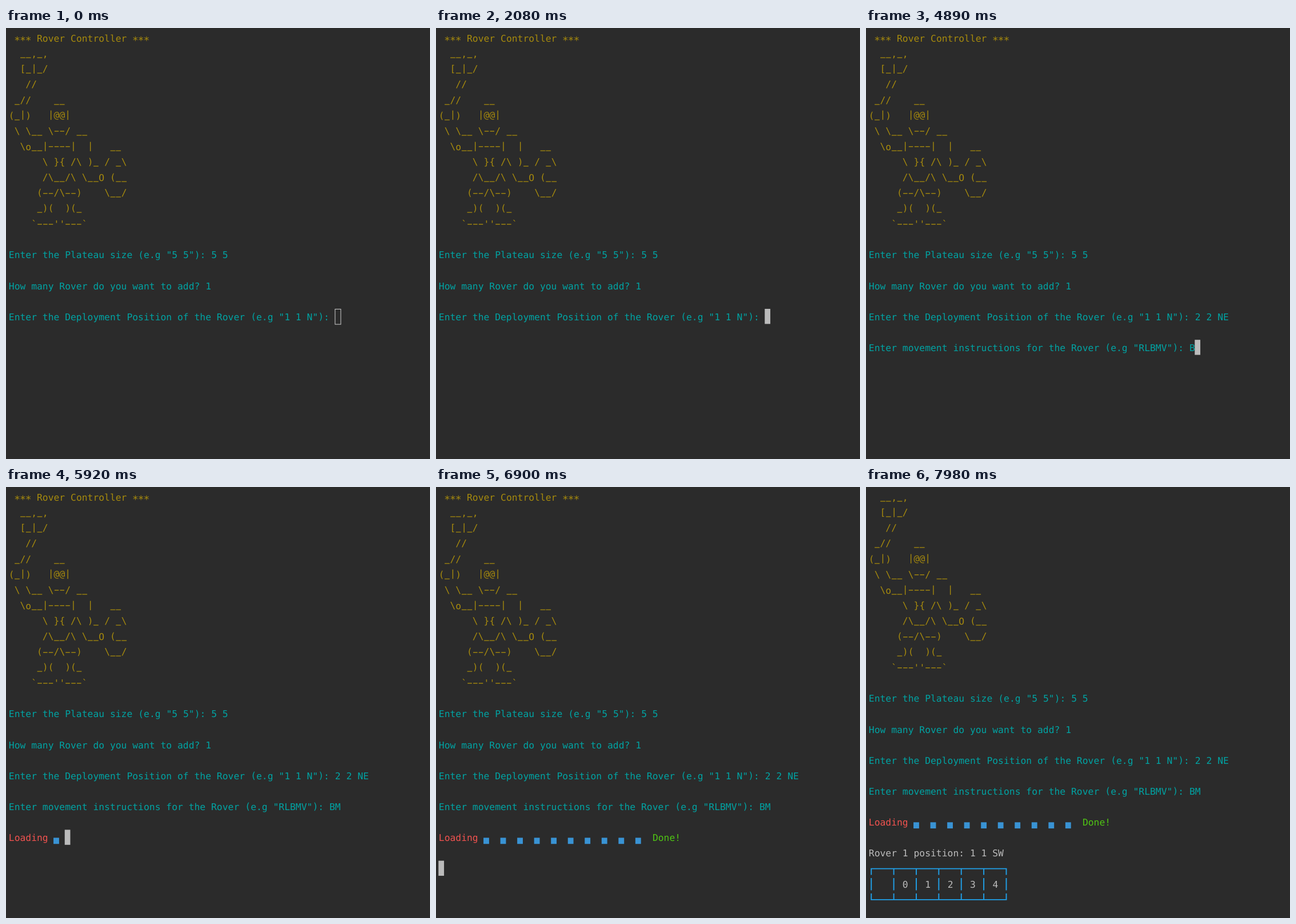
An HTML page that plays this animation: 742 px wide and 755 px high, repeating every 8000 ms.

```html
<!DOCTYPE html>
<html lang="en">
<head>
<meta charset="utf-8">
<title>Rover Controller</title>
<style>
  html, body { margin: 0; width: 100%; height: 100%; overflow: hidden; background: #2b2b2b; }
  svg { display: block; width: 742px; height: 755px; }
  text {
    font: 16.35px "DejaVu Sans Mono", monospace;
    white-space: pre;
    text-rendering: geometricPrecision;
    font-variant-ligatures: none;
  }
</style>
</head>
<body>
<svg id="stage" viewBox="0 0 742 755"></svg>
<script>
const LOOP = 8000;
const X0 = 4.3, CW = 9.845, Y0 = 4, RH = 27.11, BASE = 19.9, FONT = 16.35;
const YELLOW = '#a68a0d', CYAN = '#00a3a3', RED = '#f0524f', GREEN = '#4fc414',
      BLUE = '#3993d4', LINE = '#20a0e8', GREY = '#bbbbbb';

const ART = String.raw` *** Rover Controller ***
  __,_,
  [_|_/
   //
 _//    __
(_|)   |@@|
 \ \__ \--/ __
  \o__|----|  |   __
      \ }{ /\ )_ / _\
      /\__/\ \__O (__
     (--/\--)    \__/
     _)(  )(_
    ${'`'}---''---${'`'}`.split('\n');

const ASK_POS = 'Enter the Deployment Position of the Rover (e.g "1 1 N"): ';
const ASK_MOVE = 'Enter movement instructions for the Rover (e.g "RLBMV"): ';
const POS_KEYS = [2230, 2500, 2760, 2900, 3290, 3440];
const MOVE_KEYS = [4890, 5160];
const BLOCKS = [5920, 6030, 6100, 6250, 6360, 6470, 6570, 6680, 6790, 6900];
const CELLS = [7470, 7570, 7670, 7760, 7900, 7980];

// mouse path: time, x, y
const MOUSE = [
  [130, 672, 617], [210, 655, 575], [290, 640, 537], [360, 629, 506], [440, 622, 492],
  [660, 623, 495], [820, 632, 493], [930, 645, 490], [1130, 662, 487], [1240, 683, 485]
];
const MOUSE_END = 1350;

// vertical nudge and size of the glyphs that sit differently on the line
const NUDGE = { '*': 3.8, '_': -1.8, '|': -2, '/': -0.8, '\\': -0.8, '(': -0.8, ')': -0.8,
                '[': -0.8, '{': -0.8, '}': -0.8, '@': -1.5, '-': -1.3 };
const SIZE = { '*': 18, '_': 14, '-': 13.5 };

const colX = c => X0 + c * CW;
const rowY = r => Y0 + r * RH;
const count = (times, t) => times.filter(k => k <= t).length;
const n2 = v => +v.toFixed(2);

function write(row, col, str, fill) {
  const y = rowY(row) + BASE;
  let out = '';
  for (const m of str.matchAll(/[*_|/\\()[{}@-]|[^*_|/\\()[{}@-]+/g)) {
    const s = m[0], size = SIZE[s] || FONT;
    const x = colX(col + m.index) + 0.5 + (FONT - size) * 0.3;
    const bold = size < FONT ? ` stroke="${fill}" stroke-width=".4"` : '';
    out += `<tspan x="${n2(x)}" y="${n2(y + (NUDGE[s] || 0))}" style="font-size:${size}px"${bold}>` +
           `${s === '-' ? '\u2212' : s}</tspan>`;
  }
  return `<text fill="${fill}">${out}</text>`;
}

const rect = (x, y, w, h, fill) =>
  `<rect x="${n2(x)}" y="${n2(y)}" width="${n2(w)}" height="${n2(h)}" fill="${fill}"/>`;

const caret = (row, col) => rect(colX(col), rowY(row), 9.75, 26.4, GREY);

const hollow = (row, col) =>
  `<rect x="${n2(colX(col) + .6)}" y="${n2(rowY(row) + .5)}" width="10" height="26.6" fill="none" stroke="#d0d0d0"/>`;

function table(row, cells) {
  const mid = r => rowY(r) + BASE - 5.9;
  const top = mid(row), low = mid(row + 2), left = colX(.5), right = colX(cells * 4 + .5);
  let d = `M${left - 1} ${top}H${right + 1}M${left - 1} ${low}H${right + 1}`;
  let out = '';
  for (let i = 0; i <= cells; i++) {
    const x = colX(i * 4 + .5);
    d += `M${x} ${top}v10.8M${x} ${mid(row + 1) - 10.8}v21.6M${x} ${low}v-10.8`;
    if (i > 1) out += write(row + 1, i * 4 - 2, String(i - 2), GREY);
  }
  return `<path d="${d}" fill="none" stroke="${LINE}" stroke-width="1.9"/>` + out;
}

function mouse(t) {
  const at = MOUSE[count(MOUSE.map(p => p[0]), t) - 1];
  if (!at || t >= MOUSE_END) return '';
  return `<path transform="translate(${at[1]} ${at[2]})" d="M.5 .5V16.5L4.2 13L6.7 18.5L9 17.5L6.6 12H11.5Z" fill="#fff" stroke="#000"/>`;
}

function caretAt(t) {
  if (t < 1020) return hollow(18, 58);
  if (t < 1550 || (t >= 2080 && t < 3890)) return caret(18, 58 + count(POS_KEYS, t));
  if (t >= 4370 && t < 5630) return caret(20, 57 + count(MOVE_KEYS, t));
  if (t >= 5850 && t < 6900) return caret(22, 7 + 3 * count(BLOCKS, t));
  if (t >= 6900 && t < 7370) return caret(24, 0);
  return '';
}

function scene(t) {
  const cells = count(CELLS, t), up = cells ? 1 : 0;
  let out = '';
  ART.forEach((s, i) => { if (i >= up) out += write(i - up, 0, s, YELLOW); });
  out += write(14 - up, 0, 'Enter the Plateau size (e.g "5 5"): 5 5', CYAN);
  out += write(16 - up, 0, 'How many Rover do you want to add? 1', CYAN);
  out += write(18 - up, 0, ASK_POS + '2 2 NE'.slice(0, count(POS_KEYS, t)), CYAN);
  if (t >= 4370) out += write(20 - up, 0, ASK_MOVE + 'BM'.slice(0, count(MOVE_KEYS, t)), CYAN);
  if (t >= 5850) out += write(22 - up, 0, 'Loading', RED);
  for (let i = 0; i < count(BLOCKS, t); i++)
    out += rect(colX(8 + 3 * i), rowY(22 - up) + BASE - 5.9, CW, 10.8, BLUE);
  if (t >= 6900) out += write(22 - up, 38, 'Done!', GREEN);
  if (t >= 7370) out += write(24 - up, 0, 'Rover 1 position: 1 1 SW', GREY);
  if (cells) out += table(24, cells);
  return out + caretAt(t) + mouse(t);
}

const stage = document.getElementById('stage');
const start = performance.now();
let shown = '';

function draw() {
  const next = scene((performance.now() - start) % LOOP);
  if (next !== shown) stage.innerHTML = shown = next;
  requestAnimationFrame(draw);
}
draw();
</script>
</body>
</html>
```
